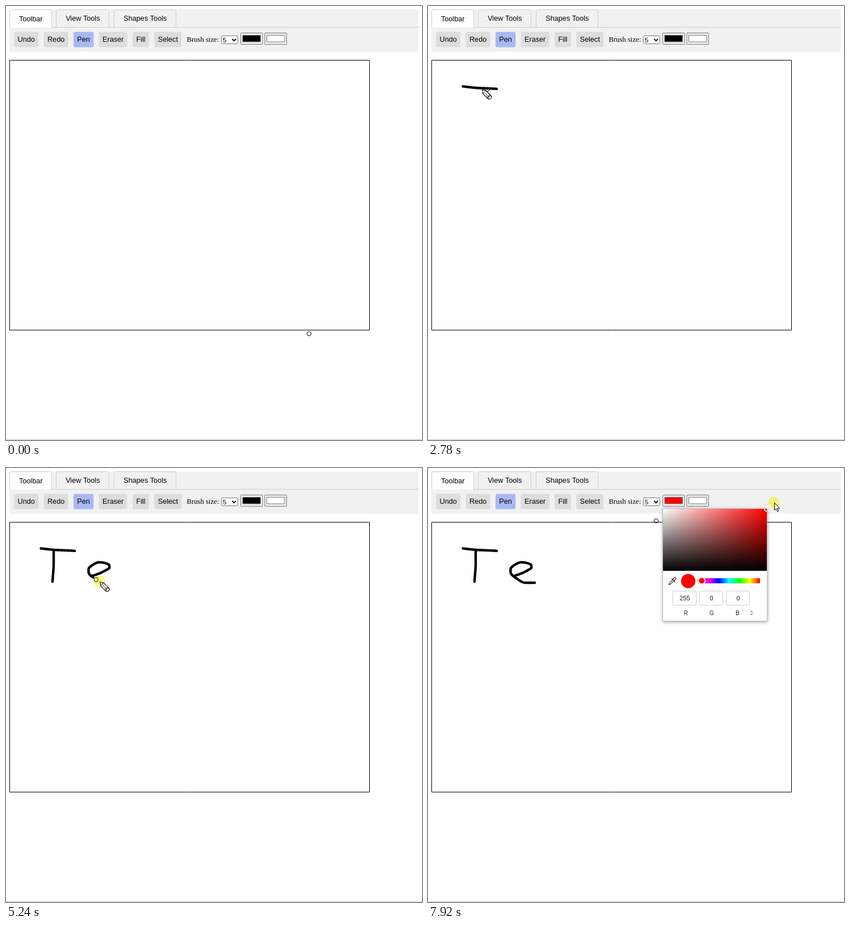
An HTML page with a canvas that plays this animation: 733x764 px, repeating every 7.99 s.

```html
<!DOCTYPE html>
<html lang="en">
<head>
<meta charset="utf-8">
<title>Paint demo</title>
<style>
html, body { margin: 0; width: 100%; height: 100%; overflow: hidden; background: #fff; }
canvas { display: block; }
</style>
</head>
<body>
<canvas id="stage" width="733" height="764"></canvas>
<script>
const LOOP = 7990;
const SANS = '"Liberation Sans", Arial, sans-serif';
const SERIF = '"Liberation Serif", "Times New Roman", serif';
const ctx = document.getElementById('stage').getContext('2d');

// Pointer path: time, x, y
const path = [
  [190, 669, 721], [360, 534, 577], [610, 302, 360], [740, 204, 255], [940, 98, 156],
  [1490, 61.5, 141.5], [2080, 61.5, 141.5], [2270, 84, 144], [2560, 121, 146], [2780, 95, 147],
  [2920, 84, 146], [2990, 84, 146], [3150, 84, 168], [3400, 82, 200], [3690, 82, 202],
  [4130, 151, 190], [4400, 181, 177], [4470, 182, 171.5], [4540, 177, 168], [4680, 164, 166],
  [4840, 147, 175], [4930, 145.5, 183], [5110, 154, 193], [5310, 172, 202], [5450, 188, 202],
  [5520, 188, 202], [5780, 252, 178], [5920, 311, 151], [5990, 336, 143], [6130, 402, 93],
  [6500, 427, 58], [7000, 431, 52], [7160, 451, 96], [7350, 505, 125], [7640, 582, 88],
  [7920, 610, 61]
];
const strokes = [[2020, 2560], [2990, 3400], [4130, 5450]];
const clicks = [[6760, 6900], [7640, LOOP]];
const CANVAS_ENTER = 360, CANVAS_LEAVE = 6130, PICKER_OPEN = 7030, DRAG_START = 7640;
const BRUSH_LAG = 70, INK_LAG = 140;

const clamp = (v, lo, hi) => Math.min(hi, Math.max(lo, v));

// Smooth interpolation that never overshoots its keys
function slope(i, k) {
  const a = path[i - 1], b = path[i], c = path[i + 1];
  if (!a || !c || (b[k] - a[k]) * (c[k] - b[k]) <= 0) return 0;
  return (c[k] - a[k]) / (c[0] - a[0]);
}
function pointer(time) {
  const t = clamp(time, path[0][0], path[path.length - 1][0]);
  let i = 0;
  while (i < path.length - 2 && path[i + 1][0] <= t) i++;
  const a = path[i], b = path[i + 1], span = b[0] - a[0], u = (t - a[0]) / span, w = 1 - u;
  return [1, 2].map(k =>
    w * w * (1 + 2 * u) * a[k] + u * u * (3 - 2 * u) * b[k] +
    span * u * w * (w * slope(i, k) - u * slope(i + 1, k)));
}

function paint(fill, stroke, width = 1) {
  if (fill) { ctx.fillStyle = fill; ctx.fill(); }
  if (stroke) { ctx.strokeStyle = stroke; ctx.lineWidth = width; ctx.stroke(); }
}
function box(x, y, w, h, fill, stroke, radius = 0) {
  ctx.beginPath();
  ctx.roundRect(x, y, w, h, radius);
  paint(fill, stroke);
}
function disc(x, y, r, fill, stroke, width) {
  ctx.beginPath();
  ctx.arc(x, y, r, 0, 7);
  paint(fill, stroke, width);
}
function shape(d, fill, stroke, width = 1) {
  const p = new Path2D(d);
  if (fill) { ctx.fillStyle = fill; ctx.fill(p); }
  ctx.strokeStyle = stroke;
  ctx.lineWidth = width;
  ctx.stroke(p);
}
function setFont(size = 12.68, family = SANS) {
  ctx.font = `${size}px ${family}`;
}
function text(str, x, y, size, align = 'center', family = SANS, color = '#000') {
  setFont(size, family);
  ctx.textAlign = align;
  ctx.fillStyle = color;
  ctx.fillText(str, x, y);
}
function gradient(x0, y0, x1, y1, colors) {
  const g = ctx.createLinearGradient(x0, y0, x1, y1);
  colors.forEach((c, i) => g.addColorStop(i / (colors.length - 1), c));
  return g;
}
// Lays labels out in a row, each as wide as its text plus padding
function row(labels, x, padding, gap, drawItem) {
  for (const label of labels) {
    setFont();
    const w = ctx.measureText(label).width + padding;
    drawItem(label, x, w);
    x += w + gap;
  }
}

function drawPage(color) {
  box(0, 0, 733, 764, '#fff');
  box(6, 6, 721, 74.5, '#f1f1f1');
  box(6, 37, 721, 1, '#ccc');
  row(['View Tools', 'Shapes Tools'], 88.5, 32.5, 8.7, (label, x, w) => {
    x = Math.floor(x) + .5;
    w = Math.round(w);
    box(x, 6.5, w, 31, '#f1f1f1', '#ccc', [3, 3, 0, 0]);
    text(label, x + w / 2 + .3, 26);
  });
  box(6.5, 6.5, 74, 32, '#fff', '#ccc', [3, 3, 0, 0]);
  box(6, 38, 75, 1.5, '#f1f1f1');
  text('Toolbar', 43.7, 27);

  row(['Undo', 'Redo', 'Pen', 'Eraser', 'Fill', 'Select'], 14.2, 12.7, 9.4, (label, x, w) => {
    box(x, 45.5, w, 27, label === 'Pen' ? '#a9b8f5' : '#ddd', null, 3.2);
    text(label, x + w / 2, 63.3);
  });
  text('Brush size:', 318.5, 63, 12.68, 'left', SERIF);

  box(379.5, 52.5, 29, 14, '#fff', '#767676', 2);
  text('5', 382, 63.5, 11.5, 'left');
  shape('M398.5 58l3.3 3.3l3.3-3.3', null, '#000', 1.8);
  [color, '#fff'].forEach((fill, i) => {
    const x = 413.5 + 42.5 * i;
    box(x, 47.5, 38.5, 20, '#efefef', '#767676', 1);
    box(x + 3.5, 51.5, 31.5, 11.5, fill, '#777');
  });
  box(6.5, 95.5, 634, 475, '#fff', '#000');
  box(0, 763, 733, 1, '#c8c8c8');
}

function drawInk(t) {
  ctx.lineCap = ctx.lineJoin = 'round';
  for (const [start, end] of strokes) {
    const last = Math.min(end, t - INK_LAG);
    if (last <= start) continue;
    ctx.beginPath();
    for (let s = start; s < last; s += 10) ctx.lineTo(...pointer(s));
    ctx.lineTo(...pointer(last));
    paint(null, '#000', 4.4);
  }
  ctx.lineCap = 'butt';
  ctx.lineJoin = 'miter';
}

function drawPicker(color, rgb, handle) {
  ctx.save();
  ctx.shadowColor = 'rgba(0,0,0,.4)';
  ctx.shadowBlur = 6;
  ctx.shadowOffsetY = 1;
  box(413.5, 71.5, 184, 198, '#fff');
  ctx.restore();
  box(413.5, 71.5, 184, 198, '#fff', '#bbb');

  ctx.save();
  ctx.beginPath();
  ctx.rect(414, 72, 183, 109);
  ctx.clip();
  box(414, 72, 183, 109, gradient(414, 0, 597, 0, ['#fff', '#f00']));
  box(414, 72, 183, 109, gradient(0, 72, 0, 181, ['rgba(0,0,0,0)', '#000']));
  disc(...handle, 4.6, null, '#222', 1);
  disc(...handle, 3.6, null, '#fff', 1.6);
  ctx.restore();

  // Eyedropper
  shape('M424.5 205.5l1-3.2l6-6l2 2l-6 6zM429.5 194.5l6 6M431.5 196l2.5-3q1.5-1 2.5 0t0 2.5l-2.7 2.7', '#fff', '#333', 1.2);
  disc(458.5, 199, 12.6, color);
  box(476, 194, 109, 9, gradient(476, 0, 585, 0, ['#f00', '#f0f', '#00f', '#0ff', '#0f0', '#ff0', '#f00']), null, 1);
  disc(482.3, 198.5, 7, '#fff', 'rgba(0,0,0,.15)');
  disc(482.3, 198.5, 5, '#f00');
  rgb.forEach((value, i) => {
    const x = 432 + 47 * i;
    box(x - .5, 216.5, 41, 25, '#fff', '#ccc', 1);
    text(value, x + 20.5, 233.3, 11, 'center', SANS, '#222');
    text('RGB'[i], 454.3 + 45.5 * i, 258.5, 10, 'center', SANS, '#222');
  });
  shape('M568 253.7l2-2l2 2M568 256.3l2 2l2-2', null, '#222');
}

function drawCursor(t) {
  const [x, y] = pointer(t);
  if ([...strokes, ...clicks].some(([a, b]) => t >= a && t < b)) {
    ctx.globalCompositeOperation = 'multiply';
    disc(x - .5, y - .5, 10, '#ffff80');
    ctx.globalCompositeOperation = 'source-over';
  }
  ctx.save();
  ctx.translate(x, y);
  if (t < CANVAS_ENTER || t > CANVAS_LEAVE + 30) {
    shape('M.5 .5V13.5L3.5 10.8L5.7 15.6L7.8 14.6L5.7 10H9.8Z', '#fff', '#000');
  } else {
    shape('M.5 .5L7 2L16 11Q18 13 16 15.5T11 16.5L2 7.5Z', '#fff', '#000', 1.1);
    shape('M2 7.5Q3 4 7 2M5 6L12.5 13.5M11 16.5Q11 12 16 11M9.5 15Q10 11 14.5 9.5', null, '#000', .9);
  }
  ctx.restore();
}

function draw(t) {
  let handle = [414.5, 180.5], rgb = [0, 0, 0];
  if (t >= DRAG_START) {
    const [x, y] = pointer(t);
    handle = [clamp(x, 414, 596.5), clamp(y, 72.5, 181)];
    const sat = (handle[0] - 414) / 182.5, value = (181 - handle[1]) / 108.5;
    rgb = [1, 1 - sat, 1 - sat].map(c => Math.round(255 * value * c));
  }
  const color = `rgb(${rgb})`;
  drawPage(color);
  drawInk(t);
  const brush = pointer(clamp(t - BRUSH_LAG, CANVAS_ENTER, CANVAS_LEAVE));
  disc(...brush, 3.7, null, '#000');
  if (t >= PICKER_OPEN) drawPicker(color, rgb, handle);
  if (t >= 190) drawCursor(t);
}

function frame() {
  draw(performance.now() % LOOP);
  requestAnimationFrame(frame);
}
frame();
</script>
</body>
</html>
```
